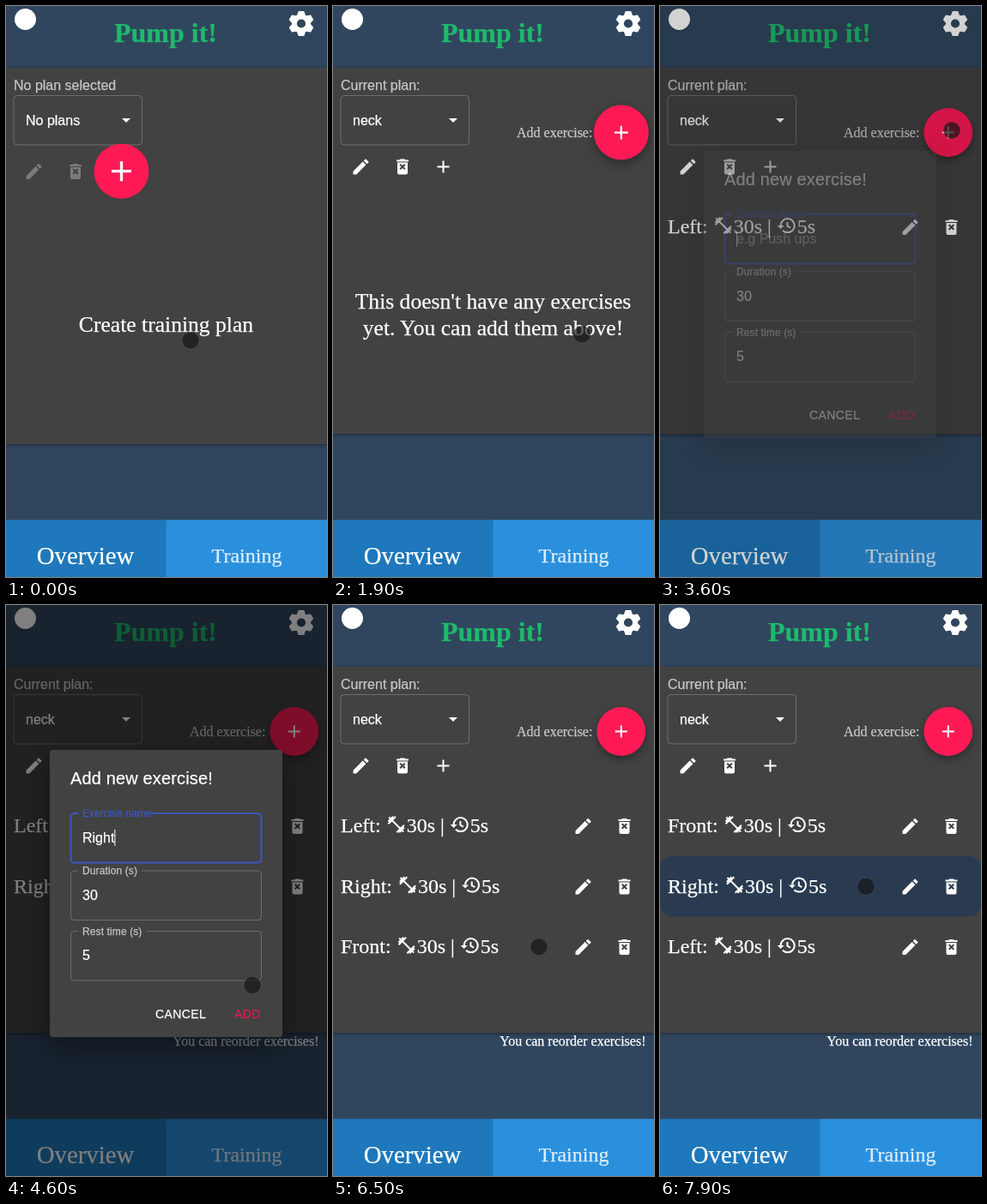
Animation, 374 px wide and 666 px high, one loop 8000 ms. Source, as an HTML page:

```html
<!DOCTYPE html>
<html lang="en">
<head>
<meta charset="utf-8">
<title>Pump it!</title>
<style>
  html, body { margin: 0; width: 100%; height: 100%; overflow: hidden; background: #30465e; }
  svg { display: block; }
  text { color: #fff; fill: currentColor; stroke: currentColor; stroke-width: .25px; white-space: pre;
    font: 16px "Liberation Sans", Arial, sans-serif; }
  .serif { font-family: "Liberation Serif", "Times New Roman", serif; }
  .mid { text-anchor: middle; }
  .big { font-size: 25.6px; }
  .item { font-size: 24px; }
  .soft { opacity: .7; }
  .title { font-size: 20px; letter-spacing: .0075em; }
  .button { font-size: 14px; letter-spacing: .02857em; }
  .label { font-size: 12px; letter-spacing: .00938em; }
  .panel { fill: #424242; filter: drop-shadow(0 1px 2px rgba(0,0,0,.45)); }
  .paper { fill: #424242; filter: drop-shadow(0 10px 16px rgba(0,0,0,.4)); }
  .fab { fill: #ff1a55; }
  .raised { filter: drop-shadow(0 4px 5px rgba(0,0,0,.35)); }
  .box { fill: none; stroke: rgba(255,255,255,.23); }
  .focus { stroke: #3d56c0; stroke-width: 2; }
  .line { fill: none; stroke: #fff; stroke-width: 2; }
</style>
</head>
<body>
<svg id="stage" width="374" height="666" viewBox="0 0 374 666"></svg>
<script>
const LOOP = 8000, STEP = 100, MOVE = 300, ROW = 70.5, TOP = 222.5;

// Outline of a plus sign, turned by a number of degrees
function cross(arm, half, turn = 0) {
  const points = [];
  for (let a = turn; a < turn + 360; a += 90) {
    const c = Math.cos(a * Math.PI / 180), s = Math.sin(a * Math.PI / 180);
    for (const [x, y] of [[half, -half], [arm, -half], [arm, half]])
      points.push(`${x * c - y * s} ${x * s + y * c}`);
  }
  return `M${points.join('L')}z`;
}

function gear() {
  let teeth = '';
  for (let a = 0; a < 360; a += 60)
    teeth += `<path d="M-3.6 -6L-2.4 -9.6Q-2.3 -10 -1.9 -10H1.9Q2.3 -10 2.4 -9.6L3.6 -6z" transform="rotate(${a})"/>`;
  return teeth + '<circle r="5.5" class="line" style="stroke-width:4"/>';
}

// Icons are 24 units wide, centred on the origin
const ICONS = {
  plus: `<path d="${cross(7, 1)}"/>`,
  arrow: '<path d="M-5 -2H5L0 3z"/>',
  gear: gear(),
  pencil: '<path d="M-2.65 -12.7h5.3l0 -.1V-9.4h-5.3zM-2.65 -7.9h5.3V7.8L0 10.5L-2.65 7.8z" transform="rotate(45) translate(0 2.2)"/>',
  trash: `<path fill-rule="evenodd" d="M-7 -8h3.5l1 -1h5l1 1H7v2H-7zM-6 -5H6V7q0 2 -2 2H-4q-2 0 -2 -2z${cross(4, 1, 45)}" />`,
  weight: '<path class="line" d="M-12 0H12M-7 -6V6M7 -6V6M-9 -4V4M9 -4V4" transform="rotate(45)"/>',
  rest: '<path class="line" d="M-7 0A8 8 0 1 1 -4.7 5.7M.75 -4V.6L4.3 2.7"/><path d="M-11 0h8l-4 4z"/>'
};

// Builders: text by baseline, icons by centre
const text = (x, y, cls, s, more = '') => `<text x="${x}" y="${y}" class="${cls}" ${more}>${s}</text>`;
const icon = (name, x, y, size = 24, alpha = 1) =>
  `<g fill="#fff" opacity="${alpha}" transform="translate(${x} ${y}) scale(${size / 24})">${ICONS[name]}</g>`;
const rect = (x, y, w, h, attrs) => `<rect x="${x}" y="${y}" width="${w}" height="${h}" ${attrs}/>`;
const group = (id, body) => `<g id="${id}">${body}</g>`;
const fab = (id, x, y, size, cls) =>
  `<g transform="translate(${x} ${y})">${group(id, `<circle r="28.4" class="fab ${cls}"/>` + icon('plus', 0, 0, size))}</g>`;

const select = (label, value) =>
  text(9, 98, 'soft', label) + rect(9, 104.5, 149.5, 57.5, 'rx="4" class="box"') +
  text(23, 138.5, '', value) + icon('arrow', 140, 133);

const field = (y, label, width, value, focused) =>
  rect(75.5, y, 222, 57.5, `rx="4" class="box ${focused ? 'focus' : ''}"`) +
  rect(84, y - 2, width, 4, 'fill="#424242"') +
  text(89, y + 4, 'label soft', label, focused ? 'style="color:#3d56c0;opacity:1"' : '') + value;

const input = (id, y) =>
  text(89, y, '', '', `id="${id}"`) + rect(89, y - 15, 1, 19, `id="${id}Caret" fill="#fff"`);

const dialog = (id, y, h, title, body) => group(id,
  rect(51, y, 271, h, 'rx="4" class="paper"') + text(75, y + 39.5, 'title', title) + body +
  text(174, y + h - 22, 'button', 'CANCEL') +
  text(266, y + h - 22, 'button', 'ADD', 'style="color:#e01a50"'));

const row = name => group(name,
  rect(0, 0, 374, ROW, `id="${name}Back" rx="14" fill="#2a3b51"`) +
  text(9, 42.5, 'serif item', name + ': ', `id="${name}Label"`) +
  `<g id="${name}Info">${icon('weight', 12, 33.5)}${text(24, 42.5, 'serif item', '30s | ')}` +
  `${icon('rest', 86, 33.5)}${text(98, 42.5, 'serif item', '5s')}</g>` +
  icon('pencil', 291.5, 35.5) + icon('trash', 339.5, 35.5));

const names = ['Left', 'Right', 'Front'];

document.getElementById('stage').innerHTML =
  rect(0, 0, 374, 666, 'fill="#30465e"') +
  group('start',
    rect(0, 72, 374, 439, 'class="panel"') + select('No plan selected', 'No plans') +
    icon('pencil', 32.5, 193, 24, .3) + icon('trash', 81, 193, 24, .3) +
    fab('addPlan', 134.5, 192.7, 35, '') +
    text(186.5, 380, 'serif big mid', 'Create training plan')) +
  group('plan',
    rect(0, 72, 374, 427, 'class="panel"') + select('Current plan:', 'neck') +
    icon('pencil', 32.5, 187.5) + icon('trash', 81, 187.5) + icon('plus', 128.5, 187.5) +
    text(214, 153, 'serif soft', 'Add exercise:') +
    fab('addExercise', 335.8, 147.5, 24, 'raised') +
    group('empty',
      text(186.5, 353, 'serif big mid', "This doesn't have any exercises") +
      text(186.5, 384, 'serif big mid', 'yet. You can add them above!')) +
    names.map(row).join('') +
    text(364.5, 514, 'serif', 'You can reorder exercises!', 'id="hint" text-anchor="end"')) +
  '<circle cx="22.5" cy="15.5" r="12.5" fill="#fff"/>' + icon('gear', 344, 20.5, 35) +
  text(186, 42, 'serif mid', 'Pump it!', 'style="font-size:32px;font-weight:bold;color:#1db96c"') +
  rect(0, 599.4, 187, 67, 'fill="#1e78bb"') + rect(186.5, 599.4, 187.5, 67, 'fill="#2a90de"') +
  text(92.5, 651, 'serif mid', 'Overview', 'style="font-size:28.8px"') +
  text(280.5, 649, 'serif mid item', 'Training', 'opacity=".85"') +
  rect(0, 0, 374, 666, 'id="dim"') +
  dialog('planDialog', 239, 195, 'Add plan', field(314, 'Name', 44, input('planName', 348), true)) +
  dialog('exerciseDialog', 169, 335, 'Add new exercise!',
    field(243, 'Exercise name', 84, text(89, 277, '', 'e.g Push ups', 'id="sample" opacity=".5"') +
      input('exerciseName', 277), true) +
    field(310, 'Duration (s)', 74, text(89, 344, '', '30')) +
    field(380.5, 'Rest time (s)', 80, text(89, 414, '', '5'))) +
  '<circle id="cursor" r="10" fill="rgba(20,20,20,.68)" stroke="rgba(255,255,255,.07)"/>';

const $ = id => document.getElementById(id);
const show = (id, on) => { $(id).style.display = on ? '' : 'none'; };

for (const n of names)
  $(n + 'Info').setAttribute('transform', `translate(${9 + $(n + 'Label').getComputedTextLength()} 0)`);

// Each dialog: opened by a click, a word typed, closed by ADD
const sessions = [
  { word: 'neck', open: 500, type: 1000, close: 1700, opener: [136, 196], confirm: [281, 408] },
  { word: 'Left', open: 2250, type: 2500, close: 3150 },
  { word: 'Right', open: 3520, type: 4000, close: 4600 },
  { word: 'Front', open: 4890, type: 5200, close: 5950 }
];
const [planned, ...exercises] = sessions;

// Rows dragged upwards, lifted just before they move
const drags = [
  { name: 'Front', from: 2, to: 0, at: 6800 },
  { name: 'Right', from: 2, to: 1, at: 7500 }
];

// Cursor stops: [arrival, [x, y]]
const rowSpot = slot => [240, TOP + ROW * (slot + .5)];
const stops = [
  [0, [215, 390]],
  [1900, [290, 383]],
  [6400, rowSpot(2)],
  ...sessions.flatMap(({ open, close, opener = [340, 145], confirm = [281, 478] }) =>
    [[open - 50, opener], [open + 600, [209, 263]], [close - 100, confirm]]),
  ...drags.flatMap(d => [[d.at - 100, rowSpot(d.from)], [d.at + MOVE, rowSpot(d.to)]])
].sort((a, b) => a[0] - b[0]);

const clamp = v => Math.max(0, Math.min(1, v));
const ease = v => { const p = clamp(v); return p * p * (3 - 2 * p); };
const fade = (t, s) => Math.min(clamp((t - s.open) / 225), clamp(1 - (t - s.close) / 195));
const typed = (s, t) => s.word.slice(0, Math.max(0, Math.floor((t - s.type) / STEP) + 1));
const pulse = (id, t) =>
  $(id).setAttribute('transform', `scale(${1.0625 + .0625 * Math.cos(t / 800 * 2 * Math.PI)})`);

function cursorAt(t) {
  let pos = stops[0][1];
  for (let i = 1; i < stops.length; i++) {
    const [time, goal] = stops[i];
    const span = Math.min(MOVE, time - stops[i - 1][0]);
    const p = ease((t - time + span) / span);
    pos = pos.map((v, k) => v + (goal[k] - v) * p);
  }
  return pos;
}

// Rows between the two ends of a drag make room for the dragged one
function slotsAt(t) {
  const slots = { Left: 0, Right: 1, Front: 2 };
  for (const d of drags) {
    const p = ease((t - d.at) / MOVE);
    for (const n of names) {
      if (n === d.name) slots[n] += (d.to - d.from) * p;
      else if (slots[n] >= d.to && slots[n] < d.from) slots[n] += p;
    }
  }
  return slots;
}

function write(id, value) {
  $(id).textContent = value;
  $(id + 'Caret').setAttribute('x', 89 + (value ? $(id).getComputedTextLength() : 0));
}

function fadeDialog(id, alpha) {
  show(id, alpha > 0);
  $(id).setAttribute('opacity', alpha);
}

function render(t) {
  const count = exercises.filter(s => t >= s.close).length;
  show('start', t < planned.close);
  show('plan', t >= planned.close);
  show('empty', !count);
  show('hint', count > 1);
  pulse('addPlan', t);
  pulse('addExercise', count ? 400 : t - 1900);

  const slots = slotsAt(t);
  names.forEach((n, i) => {
    show(n, i < count);
    show(n + 'Back', drags.some(d => d.name === n && t >= d.at - 100 && t < d.at + MOVE + 200));
    $(n).setAttribute('transform', `translate(0 ${TOP + ROW * slots[n]})`);
  });

  const current = exercises.find(s => t < s.close + 195) || exercises[2];
  const planAlpha = fade(t, planned), alpha = fade(t, current);
  fadeDialog('planDialog', planAlpha);
  fadeDialog('exerciseDialog', alpha);
  $('dim').setAttribute('opacity', .5 * Math.max(planAlpha, alpha));

  const word = typed(current, t);
  show('sample', !word);
  write('planName', typed(planned, t));
  write('exerciseName', word);
  $('cursor').setAttribute('transform', `translate(${cursorAt(t)})`);
}

// The picture advances ten times a second
let last = -1;
function tick() {
  const t = Math.floor(performance.now() % LOOP / STEP) * STEP;
  if (t !== last) render(last = t);
  requestAnimationFrame(tick);
}
tick();
</script>
</body>
</html>
```
